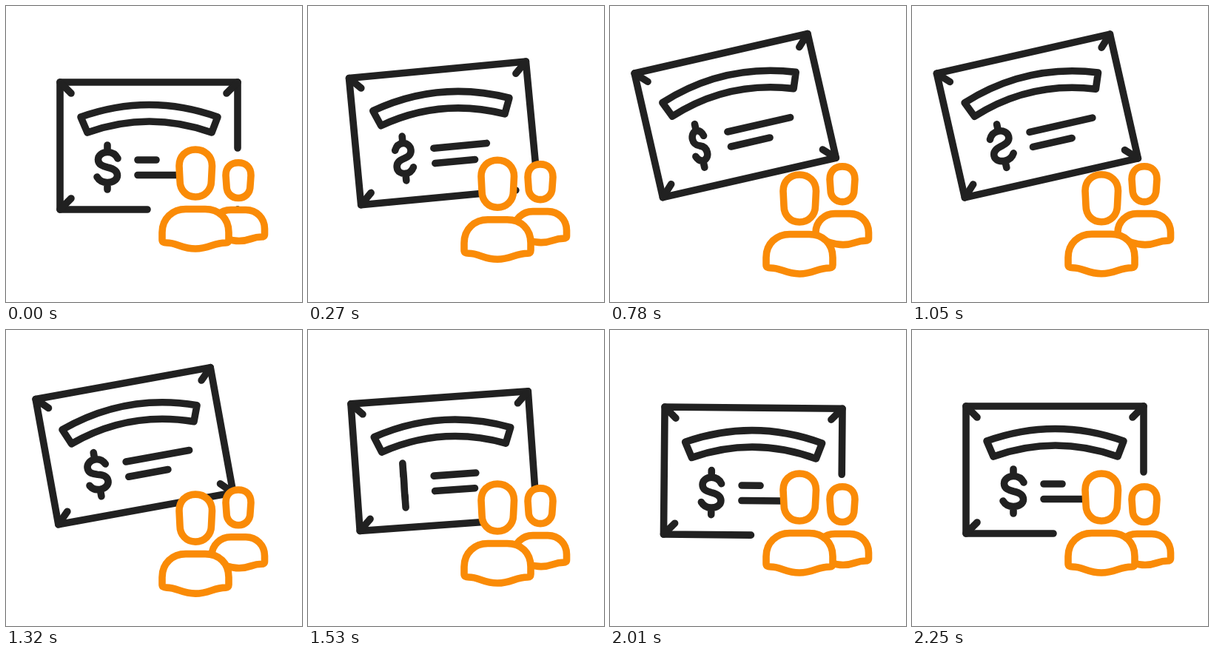
Recreate the animation shown at these times as an HTML page with a canvas. Size 400 by 400 pixels, loop 2280 ms.

```html
<!DOCTYPE html>
<html lang="en">
<head>
<meta charset="utf-8">
<title>Cheque and people</title>
<style>
  html, body { margin: 0; width: 100%; height: 100%; overflow: hidden; background: #fff; }
  canvas { display: block; width: 100vmin; height: 100vmin; }
</style>
</head>
<body>
<canvas id="stage"></canvas>
<script>
const LOOP = 2280, PEAK = 900, DOWN = 1800, REST = 2250, FLIP_END = 2040;
const DARK = '#212121', ORANGE = '#fa8b07';
const canvas = document.getElementById('stage');
const ctx = canvas.getContext('2d');

const HEAD_FRONT = new Path2D('M234 216C234 203 243 194 256 194S278.5 203 278.5 216L277.5 236C277.5 249 268 258 256 258S235 249 235 236Z');
const BODY_FRONT = new Path2D('M243 274.5H269C288 274.5 301 287 301 306V316Q301 320 297 320C280 320 275 328 256 328S232 320 217 320Q211 320 211 316V306C211 287 225 274.5 243 274.5Z');
const HEAD_BACK = new Path2D('M297 229C297 218 304 211.7 314 211.7S331 218 331 229L330 243C330 253 323 259.5 314 259.5S298 253 298 243Z');
const BODY_BACK = new Path2D('M304 275.5H324C339 275.5 349.5 287 349.5 301V308.5Q349.5 312 345 312C332 312 330 317.5 315 317.5S296 312 283 312Q278 312 278 308V301C278 286 290 275.5 304 275.5Z');
const BANNER = new Path2D('M-92 -39Q.5 -72 93 -39L85 -18Q.5 -48 -83 -18Z');
const DOLLAR = new Path2D('M0 -30V-20.5M0 20.5V30M14 -12C11 -18 6 -20.5 0 -20.5C-7 -20.5 -12.5 -16 -12.5 -10.5C-12.5 -3.5 -6 -1.5 0 0C7 1.5 13.5 4 13.5 11C13.5 17 7 20.5 0 20.5C-6 20.5 -11 18 -14 13');

const clamp = x => Math.min(1, Math.max(0, x));
const lerp = (a, b, k) => a + (b - a) * k;
const smooth = x => (x = clamp(x), x * x * (3 - 2 * x));

// Cubic Bezier easing with control points (.36, 0) and (.2, 1).
function ease(x) {
  x = clamp(x);
  let lo = 0, hi = 1;
  for (let i = 0; i < 24; i++) {
    const s = (lo + hi) / 2, r = 1 - s;
    if (3 * r * r * s * 0.36 + 3 * r * s * s * 0.2 + s ** 3 < x) lo = s; else hi = s;
  }
  return lo * lo * (3 - 2 * lo);
}

function cardPose(t) {
  const up = { x: -24, y: -41.3, angle: -13 };
  const low = { x: 1, y: 8.5, angle: 2.1 };
  const home = { x: 0, y: 0, angle: 0 };
  const mix = (a, b, k) => ({ x: lerp(a.x, b.x, k), y: lerp(a.y, b.y, k), angle: lerp(a.angle, b.angle, k) });
  if (t < PEAK) return mix(home, up, ease(t / PEAK));
  if (t < DOWN) return mix(low, up, ease((DOWN - t) / PEAK));
  return mix(low, home, ease((t - DOWN) / (REST - DOWN)));
}

function line(...points) {
  ctx.beginPath();
  for (let i = 0; i < points.length; i += 2) ctx.lineTo(points[i], points[i + 1]);
  ctx.stroke();
}

function drawDollar(x, y, flip) {
  const path = new Path2D();
  // Flip the outline only, so the line weight stays constant.
  path.addPath(DOLLAR, new DOMMatrix([flip, 0, 0, 1, x, y]));
  ctx.stroke(path);
}

function drawCard(t) {
  const pose = cardPose(t);
  const reveal = t < PEAK ? smooth(t / 400) : 1 - smooth((t - 1310) / 450);
  const w = 120, h = 86, tick = 15;
  ctx.save();
  ctx.translate(193 + pose.x, 189 + pose.y);
  ctx.rotate(pose.angle * Math.PI / 180);
  ctx.strokeStyle = DARK;
  line(-w + lerp(118, 2 * w, reveal), h, -w, h, -w, -h, w, -h, w, -h + lerp(89, 2 * h, reveal));
  line(-w, -h, -w + tick, -h + tick);
  line(w, -h, w - tick, -h + tick);
  line(-w, h, -w + tick, h - tick);
  if (reveal > 0) line(w, h, w - tick * reveal, h - tick * reveal);
  ctx.stroke(BANNER);
  line(-15, 19, -15 + lerp(25, 87, reveal), 19);
  line(-15, 39.5, 39, 39.5);
  drawDollar(-56, 29, Math.cos(clamp(t / FLIP_END) * 6 * Math.PI));
  ctx.restore();
}

function drawPerson(head, body, dy) {
  ctx.save();
  ctx.translate(0, dy);
  ctx.strokeStyle = ORANGE;
  ctx.fillStyle = '#fff';
  for (const part of [head, body]) {
    ctx.fill(part);
    ctx.stroke(part);
  }
  ctx.restore();
}

function draw(t) {
  const size = Math.round(Math.min(innerWidth, innerHeight) * devicePixelRatio) || 400;
  if (canvas.width !== size) canvas.width = canvas.height = size;
  ctx.setTransform(size / 400, 0, 0, size / 400, 0, 0);
  ctx.fillStyle = '#fff';
  ctx.fillRect(0, 0, 400, 400);
  ctx.lineWidth = 9.6;
  ctx.lineCap = ctx.lineJoin = 'round';
  const drop = ease(1 - Math.abs(t - PEAK) / PEAK);
  drawCard(t);
  drawPerson(HEAD_BACK, BODY_BACK, 5.2 * drop);
  drawPerson(HEAD_FRONT, BODY_FRONT, 34.3 * drop);
}

const start = performance.now();
function tick() {
  draw((performance.now() - start) % LOOP);
  requestAnimationFrame(tick);
}
tick();
</script>
</body>
</html>
```
